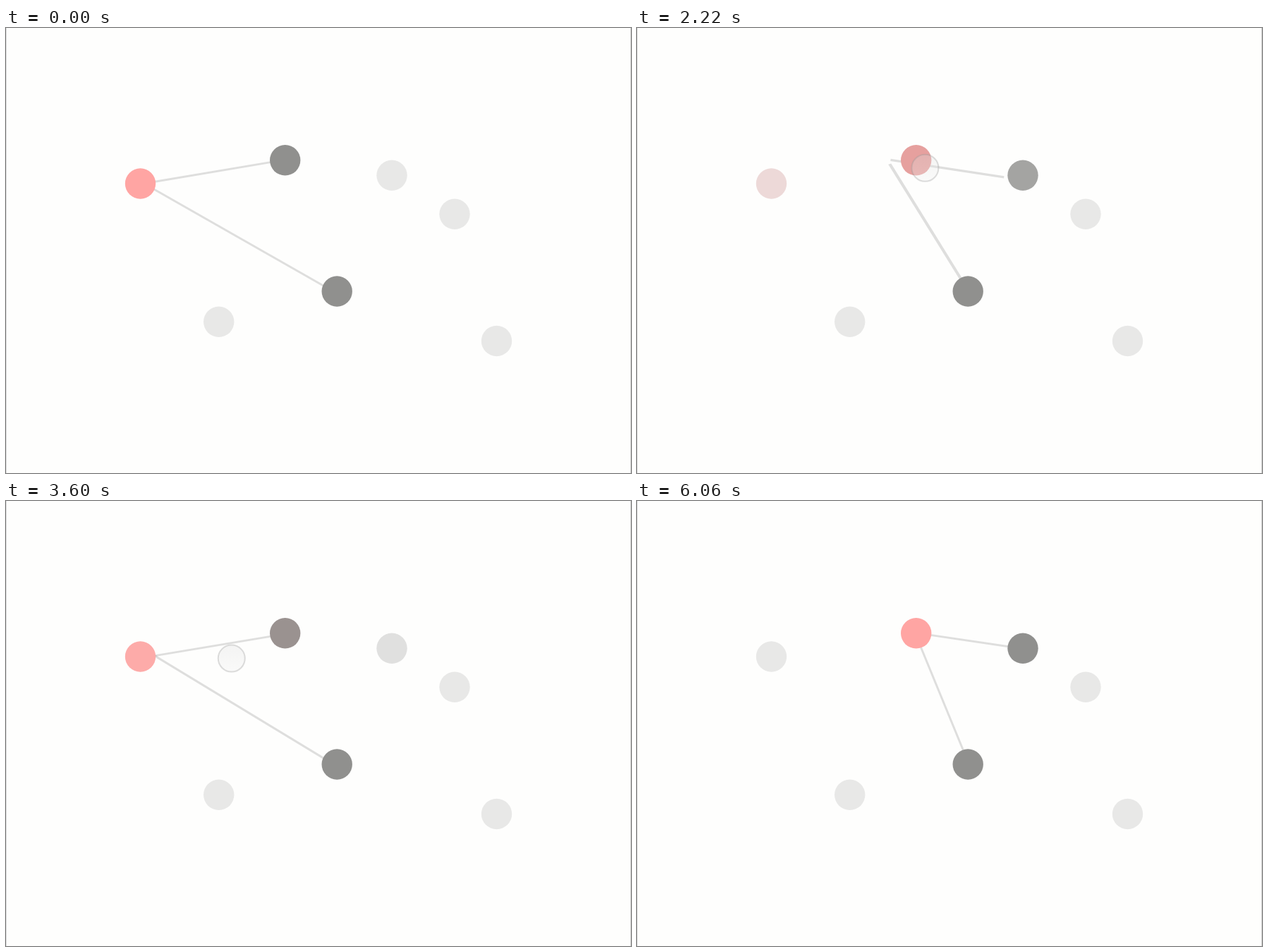
An HTML page with a canvas for the animation above (6.34 s loop, 886 px wide and 632 px high).

```html
<!DOCTYPE html>
<html lang="en">
<head>
<meta charset="utf-8">
<title>Node graph</title>
<style>
  html, body { margin: 0; width: 100%; height: 100%; overflow: hidden; background: #fefefd; }
  canvas { display: block; }
</style>
</head>
<body>
<canvas id="stage" width="886" height="632"></canvas>
<script>
const ctx = document.getElementById('stage').getContext('2d');
const LOOP = 6340, MORPH = 500, COLOR_DELAY = 25, RADIUS = 21.7;

const nodes = [
  [190.5, 221], [395.7, 187.8], [469.2, 374], [547, 209.3],
  [636, 264.3], [301.7, 417.3], [695.5, 444.5]
];
const RED = [255, 165, 163], DARK = [144, 144, 142], LIGHT = [232, 232, 231];

// Each view has one active node and two links leaving it; clicks toggle the view.
const views = [
  { active: 0, links: [1, 2] },
  { active: 1, links: [3, 2] }
];
const clicks = [1960, 3260, 4365];

const mix = (a, b, p) => a + (b - a) * p;
const clamp = x => Math.min(1, Math.max(0, x));

// cubic-bezier(.25, .1, .25, 1), solved by bisection
function ease(x) {
  if (x <= 0 || x >= 1) return clamp(x);
  const curve = (s, a, b) => 3 * s * (1 - s) ** 2 * a + 3 * s * s * (1 - s) * b + s ** 3;
  let lo = 0, hi = 1;
  for (let i = 0; i < 24; i++) {
    const mid = (lo + hi) / 2;
    if (curve(mid, .25, .25) < x) lo = mid; else hi = mid;
  }
  return curve(lo, .1, 1);
}
const glide = u => 1 - Math.exp(-6.2 * u);
const speedUp = u => u ** 1.6;

// Pointer moves along Bezier curves and rests between them.
const onSecond = [405.8, 197], onFirst = [201, 229];
const moves = [
  { start: 585, end: 2490, path: [[925, 10], [740, 410], [585, 317], onSecond], easing: glide },
  { start: 2490, end: 3140, path: [onSecond, onFirst], easing: ease },
  { start: 3280, end: 4235, path: [onFirst, [303, 240], onSecond], easing: ease },
  { start: 5220, end: 5460, path: [onSecond, [895, -22]], easing: speedUp }
];

function bezier(points, s) {
  while (points.length > 1) {
    points = points.slice(1).map((b, i) => b.map((v, d) => mix(points[i][d], v, s)));
  }
  return points[0];
}

const tint = (view, n) =>
  n === view.active ? RED : view.links.includes(n) ? DARK : LIGHT;

function drawNode(n, from, to, p) {
  const end = tint(to, n);
  const rgb = tint(from, n).map((c, i) => Math.round(mix(c, end[i], p)));
  ctx.fillStyle = `rgb(${rgb})`;
  ctx.beginPath();
  ctx.arc(...nodes[n], RADIUS, 0, 7);
  ctx.fill();
}

// The short side of a link's box reaches a little past the node centres.
function linkBox(view, k) {
  const [x1, y1] = nodes[view.active], [x2, y2] = nodes[view.links[k]];
  const w = Math.abs(x2 - x1), h = Math.abs(y2 - y1);
  const padX = w < h ? w * .02 : 0, padY = h < w ? h * .02 : 0;
  return {
    rect: [Math.min(x1, x2) - padX, Math.min(y1, y2) - padY, w + 2 * padX, h + 2 * padY],
    rising: y2 < y1
  };
}

// The new link is stretched into a box that morphs from the old one.
function drawLink(k, from, to, p) {
  const { rect: end, rising } = linkBox(to, k);
  const start = linkBox(from, k).rect;
  const [x, y, w, h] = start.map((v, i) => mix(v, end[i], p));
  ctx.save();
  ctx.translate(x, y);
  ctx.scale(w / end[2], h / end[3]);
  ctx.beginPath();
  ctx.moveTo(0, rising ? end[3] : 0);
  ctx.lineTo(end[2], rising ? 0 : end[3]);
  ctx.lineWidth = 3;
  ctx.strokeStyle = 'rgba(0, 0, 0, .127)';
  ctx.stroke();
  ctx.restore();
}

function drawPointer(x, y) {
  const fill = ctx.createLinearGradient(0, y - 19, 0, y + 19);
  fill.addColorStop(0, 'rgba(220, 220, 220, .3)');
  fill.addColorStop(1, 'rgba(241, 241, 241, .3)');
  ctx.beginPath();
  ctx.arc(x, y, 19, 0, 7);
  ctx.fillStyle = fill;
  ctx.fill();
  ctx.lineWidth = 2;
  ctx.strokeStyle = 'rgba(150, 150, 150, .32)';
  ctx.stroke();
}

function draw(t) {
  ctx.fillStyle = '#fefefd';
  ctx.fillRect(0, 0, 886, 632);
  ctx.fillStyle = '#dcdcdc';
  ctx.fillRect(0, 0, 1, 632);
  ctx.fillStyle = '#cfcfcf';
  ctx.fillRect(885, 0, 1, 632);

  const done = clicks.filter(c => c <= t);
  const to = views[done.length % 2];
  const from = done.length ? views[(done.length + 1) % 2] : to;
  const age = done.length ? t - done[done.length - 1] : LOOP;
  const shape = ease(age / MORPH), color = ease((age - COLOR_DELAY) / MORPH);

  // While the first node is left, its links pass above it.
  const below = shape < 1 && to === views[1] ? 1 : 0;
  const drawNodes = (a, b) => {
    for (let n = a; n < b; n++) drawNode(n, from, to, color);
  };
  drawNodes(0, below);
  for (const k of [0, 1]) drawLink(k, from, to, shape);
  drawNodes(below, nodes.length);

  const move = moves.filter(m => m.start <= t).pop();
  if (move && t < moves[moves.length - 1].end) {
    const u = clamp((t - move.start) / (move.end - move.start));
    drawPointer(...bezier(move.path, move.easing(u)));
  }
}

const origin = performance.now();
function tick() {
  draw((performance.now() - origin) % LOOP);
  requestAnimationFrame(tick);
}
tick();
</script>
</body>
</html>
```
